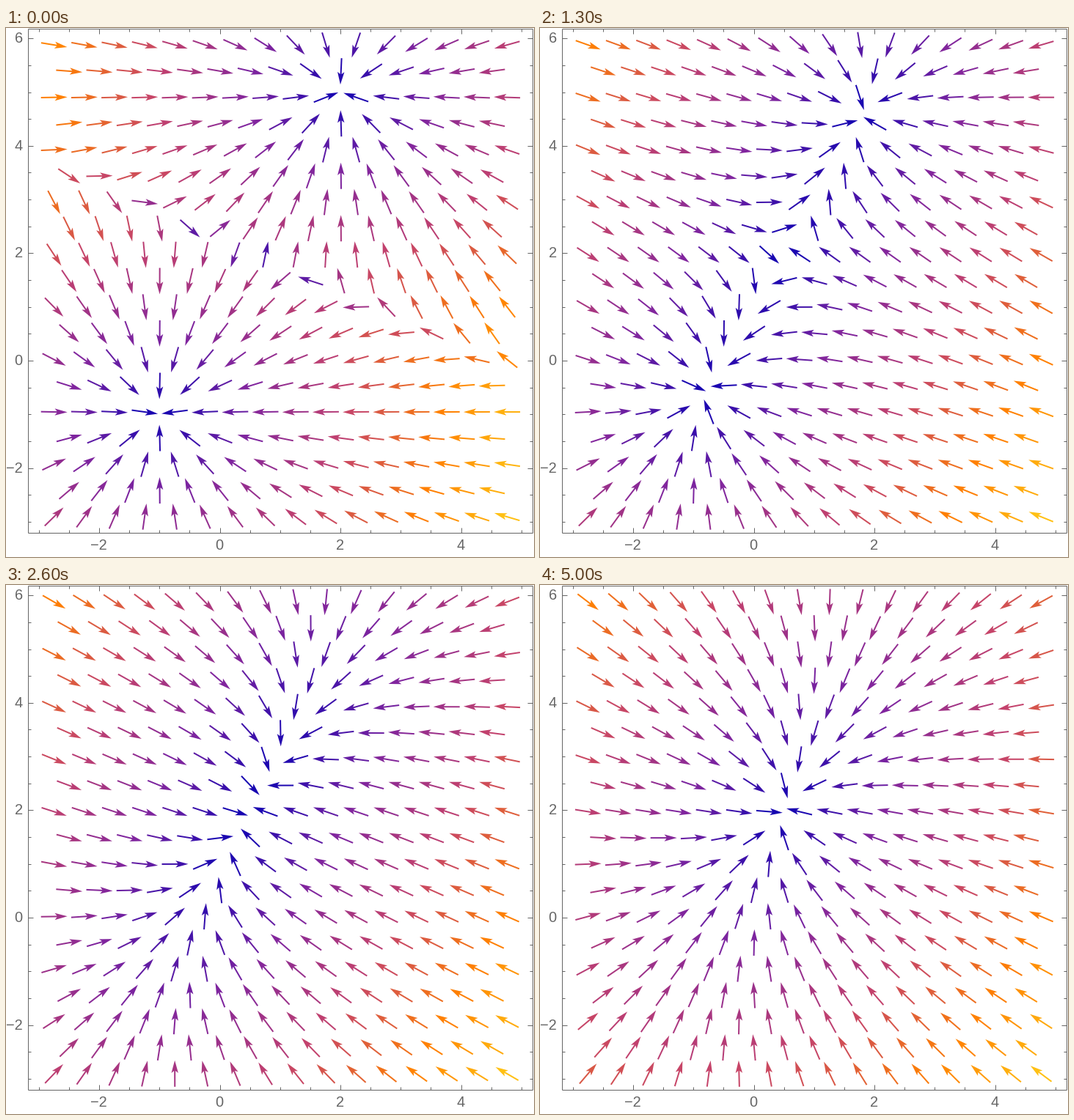
A matplotlib script for the animation above (5.1 s loop, 720 px wide and 722 px high).

```python
import numpy as np
import matplotlib.pyplot as plt
from matplotlib.animation import FuncAnimation
from matplotlib.collections import LineCollection, PolyCollection
from matplotlib.colors import LinearSegmentedColormap

W, H, DPI = 720, 722, 100
FRAMES, INTERVAL = 51, 100
PX = 72 / DPI  # points per pixel
GRAY = "#666666"

# Plot box and data scale, in pixels
LEFT, RIGHT, TOP, BOTTOM = 29.5, 717.5, 0.5, 688.5
ORIGIN = np.array([291.0, 453.5])
SCALE = np.array([82.25, -73.3])

# Two Gaussians of equal weight: midpoint and half the gap between them
CENTER = np.array([0.5, 2.0])
HALF = np.array([1.5, 3.0])

# Evenly spaced key colours from slow to fast
CMAP = LinearSegmentedColormap.from_list(
    "heat", ["#0800b4", "#80259e", "#c4426c", "#ff8000", "#ffcb16"], N=512)


def make_arrow(length=36, head=17.2, notch=3, barb=4.7, shaft=1.0):
    """Outline of a dart-headed arrow along +x, in pixels."""
    tip = length / 2 + 0.3
    tail, back = tip - length, tip - head
    upper = [(tail, shaft), (back + notch, shaft), (back, barb)]
    lower = [(x, -y) for x, y in reversed(upper)]
    return np.array(upper + [(tip, 0)] + lower)


def make_grid(rows=19, cols=16):
    """Arrow centres in pixels; every other row is staggered."""
    start, step = np.array([65.4, 23.1]), np.array([41.2, 35.78])
    cells = [(col + 0.5 * (row % 2), row)
             for row in range(rows) for col in range(cols - row % 2)]
    return start + step * np.array(cells)


def pull(pos, var):
    """Score of the blurred mixture, up to the factor 1 / var."""
    d = pos - CENTER
    side = np.tanh(d @ HALF / var)
    return side[:, None] * HALF - d


ARROW = make_arrow()
GRID = make_grid()
POS = (GRID - ORIGIN) / SCALE
CORNERS = np.array([(x, y) for x in (-3, 5) for y in (-3, 6)])


def field(frame):
    var = 1 + 0.5 * frame
    v = pull(POS, var)
    top = np.hypot(*pull(CORNERS, var).T).max()
    tone = np.hypot(*v.T) / top
    aim = v * SCALE
    c, s = (aim / np.hypot(*aim.T)[:, None]).T[:, :, None]
    x, y = ARROW.T
    turned = np.stack([c * x - s * y, s * x + c * y], axis=-1)
    return GRID[:, None, :] + turned, CMAP(tone)


def draw_box(ax):
    lines = [[(LEFT, y), (RIGHT, y)] for y in (TOP, BOTTOM)]
    lines += [[(x, TOP), (x, BOTTOM)] for x in (LEFT, RIGHT)]
    for v in np.arange(-3, 6.01, 0.5):
        size = 7 if v % 2 == 0 else 4
        px, py = np.floor(ORIGIN + SCALE * v) + 0.5
        if v <= 5:
            lines += [[(px, BOTTOM), (px, BOTTOM - size)],
                      [(px, TOP), (px, TOP + size)]]
        lines += [[(LEFT, py), (LEFT + size, py)],
                  [(RIGHT, py), (RIGHT - size, py)]]
    ax.add_collection(LineCollection(lines, colors=GRAY, linewidths=PX))


def draw_labels(ax):
    style = dict(family="Liberation Sans", size=20 * PX, color=GRAY,
                 va="baseline")
    for v in range(-2, 7, 2):
        px, py = ORIGIN + SCALE * v
        label = str(v).replace("-", "\u2212")
        if v < 6:
            ax.text(px, 711.5, label, ha="center", **style)
        ax.text(22.7, py + 6.5, label, ha="right", **style)


fig = plt.figure(figsize=(W / DPI, H / DPI), dpi=DPI, facecolor="white")
ax = fig.add_axes([0, 0, 1, 1])
ax.set_xlim(0, W)
ax.set_ylim(H, 0)
ax.axis("off")
draw_box(ax)
draw_labels(ax)

shapes, colors = field(0)
arrows = PolyCollection(shapes, facecolors=colors, edgecolors="none", zorder=3)
ax.add_collection(arrows, autolim=False)


def update(frame):
    shapes, colors = field(frame)
    arrows.set_verts(shapes)
    arrows.set_facecolor(colors)
    return (arrows,)


anim = FuncAnimation(fig, update, frames=FRAMES, interval=INTERVAL,
                     repeat=True, repeat_delay=0, blit=False)
plt.show()
```
